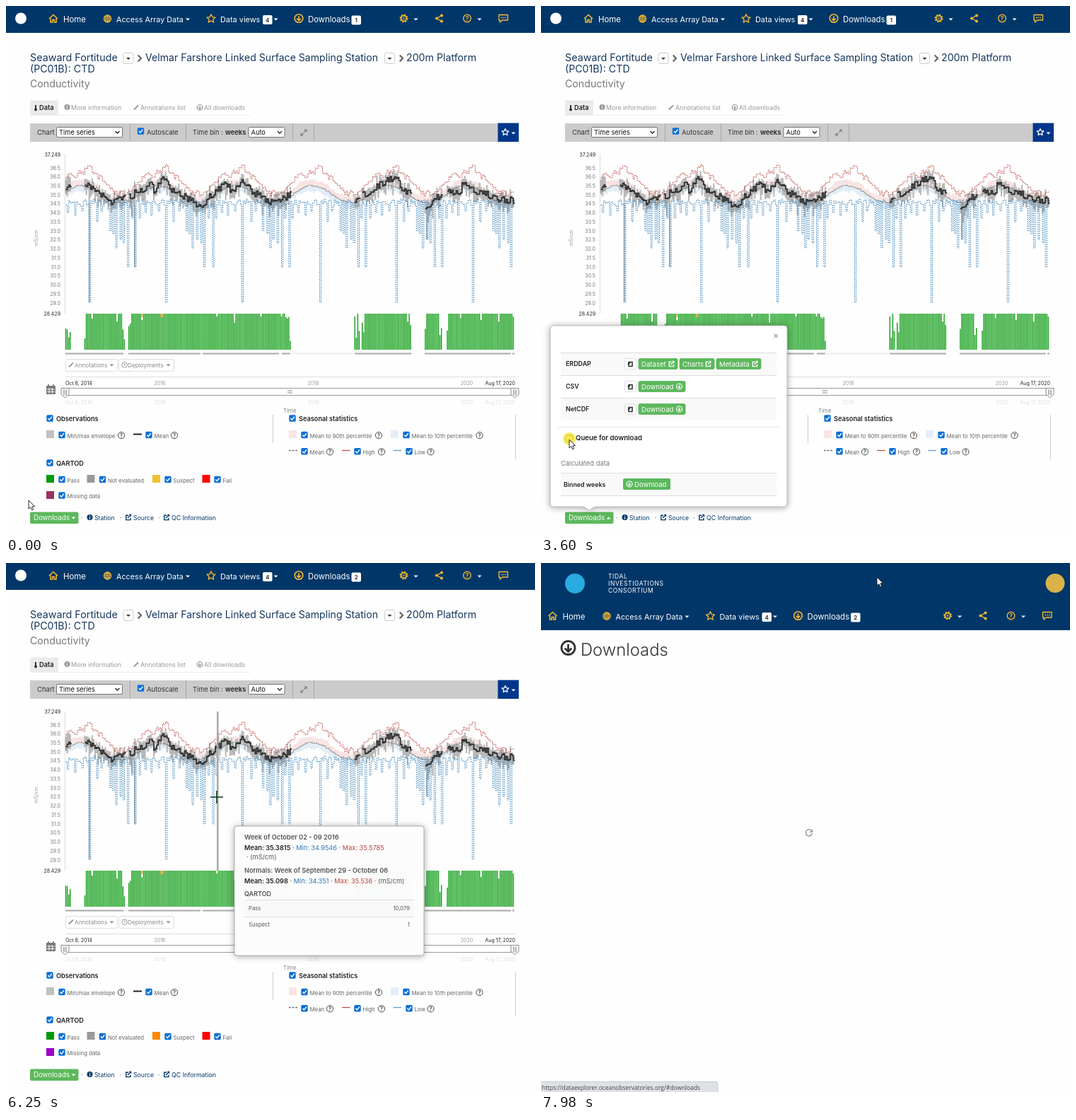
Write an HTML page that moves like this. It is 748 px wide and 748 px high and loops after 8 s.

```html
<!DOCTYPE html>
<html lang="en">
<head>
<meta charset="utf-8">
<title>Downloads</title>
<style>
html, body { margin: 0; width: 100%; height: 100%; overflow: hidden; background: #fff; }
svg { display: block; width: 100vw; height: 100vh; }
text { font-family: Inter, "Open Sans", sans-serif; }
.b { font-weight: 600; }
.l { font-weight: 300; }
.m { text-anchor: middle; }
.e { text-anchor: end; }
.url { font-family: "Open Sans", "Noto Sans", sans-serif; }
.shade { filter: drop-shadow(0 1px 5px rgba(0,0,0,.35)); }
</style>
</head>
<body>
<svg id="stage" viewBox="0 0 748 748"></svg>
<script>
const NAVY = '#003768', GOLD = '#fdbb30', GREEN = '#5cb85c', INK = '#333', MUTE = '#999';

// Drawing helpers, all return SVG markup
const text = (x, y, s, size, fill = INK, cls = '', more = '') =>
  `<text x="${x}" y="${y}" font-size="${size}" fill="${fill}" class="${cls}" ${more}>${s}</text>`;
const rect = (x, y, w, h, fill, more = '') =>
  `<rect x="${x}" y="${y}" width="${w}" height="${h}" fill="${fill}" ${more}/>`;
const line = (d, stroke, w = 1, more = '') =>
  `<path d="${d}" fill="none" stroke="${stroke}" stroke-width="${w}" ${more}/>`;
const fillPath = (d, fill, more = '') => `<path d="${d}" fill="${fill}" ${more}/>`;
const circle = (x, y, r, fill, more = '') =>
  `<circle cx="${x}" cy="${y}" r="${r}" fill="${fill}" ${more}/>`;
const ring = (x, y, r, stroke, w = 1) =>
  circle(x, y, r, 'none', `stroke="${stroke}" stroke-width="${w}"`);
const at = (x, y, body) => `<g transform="translate(${x} ${y})">${body}</g>`;
const group = (id, body) => `<g id="${id}">${body}</g>`;

const caret = (x, y, fill, up) =>
  fillPath(up ? `M${x - 3} ${y + 1.5}h6l-3-3z` : `M${x - 3} ${y - 1.5}h6l-3 3z`, fill);
const check = (x, y) => rect(x - 4.7, y - 4.7, 9.4, 9.4, '#0b6fd6', 'rx="1.6"') +
  line(`M${x - 2.6} ${y}l2 2.2l3.4-4.4`, '#fff', 1.4);
const help = (x, y) => ring(x, y, 4.6, '#333', .9) + text(x, y + 2.7, '?', 7.5, INK, 'b m');
const down = (x, y, r, c, w = 1.2) => ring(x, y, r, c, w) +
  line(`M${x} ${y - r * .55}v${r * 1.1}m${-r * .5} ${-r * .5}l${r * .5} ${r * .5}l${r * .5} ${-r * .5}`, c, w);
const info = (x, y, c) => circle(x, y, 4, c) + line(`M${x} ${y - 2.4}v1.2m0 1v2.6`, '#fff', 1.3);
const ext = (x, y, c) => at(x, y, line('M0-2.8H-3.2V3.6H3V.8', c, 1.4) +
  line('M-1 1L3 -3', c, 1.4) + fillPath('M.6-4.2H4.2V-.6z', c));
const pencil = (x, y) => line(`M${x - 3} ${y + 3}l6-6`, MUTE, 2);
const clock = (x, y) => ring(x, y, 3.8, MUTE) + line(`M${x} ${y - 2.3}v2.5h1.8`, MUTE);
const star = (x, y, r, c) => {
  let d = '';
  for (let i = 0; i < 10; i++) {
    const a = i * Math.PI / 5, q = i % 2 ? r * .48 : r;
    d += `${i ? 'L' : 'M'}${(x + q * Math.sin(a)).toFixed(2)} ${(y - q * Math.cos(a)).toFixed(2)}`;
  }
  return line(d + 'Z', c, 1.3, 'stroke-linejoin="round"');
};
const button = (x, y, w, h, label) => rect(x, y, w, h, GREEN, 'rx="2" stroke="#4cae4c" stroke-width=".7"') +
  text(x + 4, y + h / 2 + 3.5, label, 9.6, '#fff');
const rand = n => { const s = Math.sin(n * 127.1 + 11.7) * 43758.5453; return s - Math.floor(s); };

// Navigation bar; the left and right halves shift separately
function nav(dl, dr, dy, badge) {
  const y = 18;
  const mark = (x, cy, s, id) => rect(x, cy - 6.5, 13.5, 13, '#fff', 'rx="2"') +
    text(x + 6.7, cy + 3, s, 8, '#222', 'b m', id ? `id="${id}"` : '');
  const left =
    line('M61 18l6-5.5l6 5.5M63 17.5v5.5h2.7v-3.5h2.6v3.5H71v-5.5', GOLD, 1.5) +
    text(81, 22.5, 'Home', 11.4, '#fff') +
    ring(143.5, y, 5, GOLD, 1.3) + line('M138.5 18h10M143.5 13v10M139.5 15.3h8M139.5 20.7h8', GOLD) +
    `<ellipse cx="143.5" cy="18" rx="2.4" ry="5" fill="none" stroke="${GOLD}"/>` +
    text(156, 22.5, 'Access Array Data', 10.8, '#fff') + caret(257, 19, '#fff') +
    star(290, y, 6.3, GOLD) + text(303, 22.5, 'Data views', 10.9, '#fff') +
    mark(363, 19.5, '4') + caret(381.5, 19, '#fff') +
    down(414, 17.5, 5.8, GOLD, 1.6) + text(427, 23, 'Downloads', 11.3, '#fff') +
    mark(488.5, 20, '2', badge);
  const right =
    ring(562.5, 17.5, 3.8, GOLD, 1.8) + ring(562.5, 17.5, 1.1, GOLD, 1) +
    circle(562.5, 17.5, 5.2, 'none', `stroke="${GOLD}" stroke-width="1.6" stroke-dasharray="2 2.08"`) +
    caret(579.5, 19, '#fff') +
    line('M616 13.5L609 17.5L616 21.5', GOLD, 1.3) +
    circle(616, 13.5, 2, GOLD) + circle(609, 17.5, 2, GOLD) + circle(616, 21.5, 2, GOLD) +
    ring(652, 17.5, 5.3, GOLD, 1.3) + text(652, 20.8, '?', 9, GOLD, 'b m') + caret(669.5, 19, '#fff') +
    line('M697 12.5h12.5v7.5h-8l-3 3v-3h-1.5z', GOLD, 1.3, 'stroke-linejoin="round"') +
    line('M700 16.5h7', GOLD, 1.6, 'stroke-dasharray="1.5 1.2"');
  return at(dl, dy, left) + at(dr, dy, right);
}

// Chart data: weekly steps, one year is 108.5 px wide
const WEEK = 2.075, YEAR = 108.5, X0 = 84.5, WEEKS = 306, SPIKE = 117;
const SEGS = [[84, 92], [110, 168], [173, 403], [493, 501], [503, 574], [591, 617], [622, 720]];
// Yearly dips: offset, depth and the year whose readings reach that low
const DIPS = [[0, 419, 0], [11, 305], [18, 290], [29, 318], [34, 322], [38, 342], [44, 330, 4], [49, 335],
  [54.5, 369], [60, 300], [65.5, 369, 0], [71, 300], [79, 292], [88, 296], [98, 290]];
const HIGH = [[0, 226], [4, 234], [9, 240], [18, 246], [27, 255], [37, 264], [50, 266], [57, 262],
  [64, 252], [74, 243], [82, 240], [92, 238], [99, 236], [104, 231], [108.5, 226]];
const SEEN = [[84, 256], [93, 260], [110, 255], [117, 252], [125, 259], [133, 265], [148, 277], [160, 274],
  [173, 271], [182, 265], [195, 260], [205, 252], [210, 262], [222, 238], [230, 256], [245, 266],
  [262, 275], [275, 283], [290, 268], [300, 260], [310, 250], [320, 262], [333, 247], [345, 260],
  [360, 270], [375, 277], [395, 272], [403, 263], [493, 273], [505, 267], [515, 262], [530, 252],
  [545, 244], [551, 240], [560, 260], [575, 268], [591, 283], [600, 280], [610, 270], [625, 262],
  [640, 267], [648, 246], [655, 254], [665, 263], [680, 267], [695, 274], [720, 275]];

function lerpAt(pts, x) {
  const i = Math.max(1, pts.findIndex(p => p[0] >= x));
  const [a, b] = [pts[i - 1], pts[i]];
  return a[1] + (b[1] - a[1]) * (x - a[0]) / (b[0] - a[0]);
}

function chart() {
  let high = '', low = '', norm = '', seen = '', env = '', bars = '', hot = '';
  const top = [], mid = [], bot = [];
  let was = false;
  for (let i = 0; i < WEEKS; i++) {
    const x = X0 + i * WEEK, end = (x + WEEK).toFixed(1), px = x.toFixed(1);
    const year = Math.floor((x - SPIKE + WEEK / 2) / YEAR);
    const off = (((x - SPIKE) % YEAR) + YEAR) % YEAR;
    const wk = Math.round(off / WEEK) % 52;
    const step = (d, y, move) => d + `${move ? 'M' : 'L'}${px} ${y.toFixed(1)}H${end}`;
    const mean = 265 - 12 * Math.cos((off + 10) / YEAR * 2 * Math.PI) + rand(wk) * 2;
    const dip = DIPS.find(d => Math.min(Math.abs(off - d[0]), YEAR - off + d[0]) <= WEEK / 2);
    high = step(high, lerpAt(HIGH, off) + (rand(wk + 60) - .5) * 10, !i);
    low = step(low, dip ? dip[1] : 273 + rand(wk + 120) * 10, !i);
    norm = step(norm, mean, !i);
    top.push([px, mean - 6 - rand(wk + 9) * 5]);
    mid.push([px, mean]);
    bot.push([px, mean + 5 + rand(wk + 30) * 6]);

    const seg = SEGS.find(s => x >= s[0] && x <= s[1]);
    if (seg) {
      const y = lerpAt(SEEN, x) + (rand(i + 300) - .5) * 10;
      const rise = x < 94 ? 14 : 3 + rand(i + 700) * 9;
      const fall = dip && dip[2] === year ? dip[1] - y : 5 + rand(i + 900) * 10 + (rand(i + 500) > .92 ? 12 : 0);
      seen = step(seen, y, !was);
      env += `M${px} ${(y - rise).toFixed(1)}V${(y + fall).toFixed(1)}`;
      const edge = x - seg[0] < 3 || seg[1] - x < 3.5;
      const loose = rand(i + 77) > .96 || (x > 388 && x < 403 && rand(i) > .5);
      const h = edge ? 12 + 36 * rand(i + 41) : loose ? 38 + 10 * rand(i) : 51;
      bars += `M${px} 486V${(486 - h).toFixed(1)}`;
      if (Math.abs(x - 193) < 1.1 || Math.abs(x - 221) < 2.2) hot += `M${px} 435v5`;
    }
    was = !!seg;
  }
  const area = (a, b, fill) => fillPath('M' + [...a, ...b.slice().reverse()]
    .map(p => p[0] + ' ' + p[1].toFixed(1)).join('L') + 'Z', fill);
  let axis = line('M83.5 210V435', '#ddd');
  for (let v = 36.5; v > 28.9; v -= .5)
    axis += text(77, (231.5 + (36.5 - v) * 25.47).toFixed(1), v.toFixed(1), 7, '#777', 'e');
  axis += text(77, 213, '37.249', 7, '#222', 'e') + text(77, 437.5, '28.429', 7, '#222', 'e') +
    text(0, 0, 'mS/cm', 7, MUTE, 'm', 'transform="translate(44.5 328) rotate(-90)"');
  return axis + area(top, mid, '#f7e4e3') + area(mid, bot, '#e2eef7') +
    line(env, '#b8b8b8', 2.1) + line(norm, '#777', 1.1, 'stroke-dasharray="2 1.5"') +
    line(high, '#b5352c', 1, 'stroke-dasharray="1.5 1.4"') +
    line(low, '#2a7ab5', 1, 'stroke-dasharray="1.6 1.5"') + line(seen, '#2b2b2b', 1.7) +
    line(bars, '#17a01d', 1.45) + line(hot, '#f0a030', 1.6) +
    line('M404 491.5H492', '#eee', 2) +
    line('M84 491.5H166M173 491.5H275M278 491.5H386M390 491.5H402M493 491.5H573M592 491.5H714M716 491.5H719', '#aaa', 2.2);
}

function heading() {
  const blue = '#16375f';
  const drop = x => rect(x, 66.5, 14, 15, '#fff', 'rx="2" stroke="#ccc"') + caret(x + 7, 74.5, '#333');
  const next = x => line(`M${x - 2.3} 69.5l4.3 4.5l-4.3 4.5`, '#666', 2.2);
  return text(34, 78, 'Seaward Fortitude', 14.3, blue) + drop(166) + next(189) +
    text(197, 78, 'Velmar Farshore Linked Surface Sampling Station', 14.1, blue) + drop(535.5) + next(559) +
    text(566, 78, '200m Platform', 14.2, blue) + text(34, 94, '(PC01B): CTD', 14.2, blue) +
    text(34, 115, 'Conductivity', 14.2, '#777');
}

function tools() {
  const select = (x, w, s) => rect(x, 171.5, w, 14, '#fff', 'rx="1.5" stroke="#767676"') +
    text(x + 3.5, 181.8, s, 9.3, '#111') + line(`M${x + w - 10} 177l3 3l3-3`, '#222', 1.4);
  return rect(34, 133.5, 40, 20.5, '#ebebeb') + line('M34 154.5H346', '#eee') +
    line('M42 140v6', '#333', 2) + circle(42, 146.5, 2, '#333') + text(47, 146.5, 'Data', 9.2, '#222', 'b') +
    info(86.5, 143, MUTE) + text(92, 146.5, 'More information', 8.8, MUTE) +
    pencil(184, 143.5) + text(190, 146.5, 'Annotations list', 8.8, MUTE) +
    down(274, 143.3, 3.8, MUTE) + text(280, 146.5, 'All downloads', 8.8, MUTE) +
    rect(34, 166, 662, 26, '#cbcbcb') + line('M175.5 166v26M254.5 166v26M405.5 166v26M435.5 166v26', '#aaa') +
    text(44, 182, 'Chart', 9.5) + select(71.5, 93, 'Time series') +
    check(190.5, 177) + text(199, 182, 'Autoscale', 9.5) +
    text(264, 182, 'Time bin :', 9.2) + text(310, 182, 'weeks', 9.4, '#222', 'b') + select(343, 51, 'Auto') +
    line('M418 182l2.5-2.5M421.5 178.5l2.5-2.5M417 180v3h3M422 175h3v3', '#777', 1.2) +
    rect(695.5, 165.5, 29.5, 26.5, '#00368a') + star(706, 178.5, 5, '#fff') + caret(717.5, 180, '#fff');
}

function slider() {
  const dates = (y, c, c2) => text(84, y, 'Oct 8, 2014', 7, c2) + text(720, y, 'Aug 17, 2020', 7, c2, 'e') +
    [[217.5, 2016], [434.5, 2018], [651.5, 2020]].map(d => text(d[0], y, d[1], 7, c, 'm')).join('');
  const knob = x => fillPath(`M${x - 5.5} 540.5h11v8.5l-5.5 5l-5.5-5z`, '#fff', 'stroke="#888"') +
    line(`M${x - 1.5} 542.5v8M${x + 1.5} 542.5v8`, '#666');
  const tag = (x, w, s) => rect(x, 499.5, w, 17, '#fff', 'rx="2" stroke="#ddd"') +
    text(x + 12.5, 510.5, s, 8.2, '#888') + caret(x + w - 8, 508, '#888');
  return tag(84.5, 73, 'Annotations') + pencil(92, 507.5) + tag(159.5, 78, 'Deployments') + clock(167.5, 507.5) +
    line('M84 524.5H720', '#ddd') + dates(536, MUTE, '#222') +
    rect(57, 537, 13, 12, '#777', 'rx="1"') + line('M58 542h11M58 545.5h11M61 540v8M65.5 540v8', '#fff', .9) +
    line('M60 535v3M67 535v3', '#777', 1.8) +
    rect(84, 540.5, 636, 10, '#fff', 'stroke="#999"') + line('M398 544h7M398 547h7', '#888') +
    knob(83.5) + knob(719.5) + dates(563, '#ddd', '#ddd') + text(392, 574.5, 'Time', 8, '#888');
}

function legend() {
  const head = (x, y, s) => check(x, y) + text(x + 9, y + 3.5, s, 9.2, '#222', 'b');
  const item = (x, y, s, q) => check(x, y) + text(x + 7.5, y + 4.3, s, 7.8, '#666') + (q ? help(q, y + .6) : '');
  const box = (x, y, c, id) => rect(x, y, 11, 11, c, id ? `id="${id}"` : '');
  return head(62, 583, 'Observations') + head(405, 583, 'Seasonal statistics') + head(62, 646, 'QARTOD') +
    box(57, 600, '#c0c0c0') + item(79, 606.5, 'Min/max envelope', 163) +
    line('M180 605.5h12', '#222', 2) + item(202, 606.5, 'Mean', 238) +
    box(400, 600, '#f8e5e4') + item(422, 606.5, 'Mean to 90th percentile', 527) +
    box(544, 600, '#e3eef8') + item(566, 606.5, 'Mean to 10th percentile', 669.5) +
    line('M400 628.5h12', '#777', 1.3, 'stroke-dasharray="3 1.5"') + item(422, 629.7, 'Mean', 458) +
    line('M475 628.5h11.5', '#bd5347', 1.3) + item(497, 629.7, 'High', 531) +
    line('M547.5 628.5h11.5', '#5f9dc8', 1.3) + item(570, 629.7, 'Low', 600.5) +
    line('M377.5 578v40M720.5 578v63', '#ccc') +
    box(57, 663, '#009a0c') + item(79, 669.5, 'Pass') +
    box(114.5, 663, '#999') + item(136.5, 669.5, 'Not evaluated') +
    box(207, 663, '#f0c132', 'suspect') + item(229, 669.5, 'Suspect') +
    box(277.5, 663, '#f00') + item(299, 669.5, 'Fail') +
    box(57, 686, '#963365', 'missing') + item(79, 692, 'Missing data');
}

function footer() {
  const dot = x => text(x, 727, '·', 9, '#444', 'm');
  return rect(34, 715.5, 68.5, 16.5, GREEN, 'rx="2" id="main"') + text(39, 727, 'Downloads', 9.7, '#fff') +
    group('shut', caret(95.5, 724, '#fff')) + group('open', caret(95.5, 724, '#fff', true)) +
    rect(35, 716.5, 67, 15, 'none', 'rx="2" stroke="#111" stroke-width="1.8" id="focus"') +
    dot(107) + info(118.5, 723, NAVY) + text(125, 726.7, 'Station', 8.7, NAVY) + dot(162) +
    ext(173, 723, NAVY) + text(180, 726.7, 'Source', 8.7, NAVY) + dot(216) +
    ext(227, 723, NAVY) + text(234, 726.7, 'QC Information', 8.8, NAVY);
}

function popup() {
  const copy = y => rect(118.5, y - 7.5, 16, 15, '#fff', 'rx="2" stroke="#ddd"') +
    line(`M124 ${y - 2.5}h5v6h-5z`, '#333', 1.6) + line(`M123 ${y + 1}l3-3`, '#333', 2);
  const row = (y, s, fill) => rect(28, y - 16, 305, 32, fill) + line(`M28 ${y - 15.5}H333`, '#ddd') +
    text(35, y + 3, s, 8.9, '#222', 'b');
  const card = fillPath('M17 452H344a4 4 0 0 1 4 4V704a4 4 0 0 1 -4 4H76l-8 5l-8-5H17a4 4 0 0 1 -4-4V456a4 4 0 0 1 4-4z',
    '#fff', 'stroke="#bbb" class="shade"');
  const get = y => button(138, y - 7.5, 66, 15, 'Download') + down(195.5, y, 4, '#fff');
  return card + line('M329.5 464l5 5m0-5l-5 5', '#aaa', 1.5) +
    row(506, 'ERDDAP', '#f9f9f9') + row(538, 'CSV', '#fff') + row(570, 'NetCDF', '#f9f9f9') +
    copy(506) + copy(538) + copy(570) +
    button(138, 498.5, 55, 15, 'Dataset') + ext(184.5, 506, '#fff') +
    button(196, 498.5, 49, 15, 'Charts') + ext(236.5, 506, '#fff') +
    button(248, 498.5, 63, 15, 'Metadata') + ext(302.5, 506, '#fff') + get(538) + get(570) +
    line('M24 595.5H336', '#e5e5e5') +
    rect(35.5, 607, 9, 9, '#fff', 'rx="1.5" stroke="#767676"') + group('queued', check(40, 611.5)) +
    text(49, 613.5, 'Queue for download', 9.6, '#222', 'b') +
    text(28, 649.5, 'Calculated data', 9.4, '#777') +
    rect(28, 660, 305, 32, '#f9f9f9') + line('M28 660.5H333M28 692.5H333', '#ddd') +
    text(32, 679.5, 'Binned weeks', 8.8, '#222', 'b') +
    rect(116, 668, 67, 16, GREEN, 'rx="2"') + down(125, 676, 4, '#fff') + text(132, 679.5, 'Download', 9.6, '#fff');
}

function tip() {
  const stats = (y, mean, min, max, tail) => text(14, y, `<tspan class="b" fill="#222">Mean: ${mean}</tspan> · ` +
    `<tspan fill="#2f78b7">Min: ${min}</tspan> · <tspan fill="#b8463b">Max: ${max}</tspan>${tail}`, 9.2, '#555');
  return rect(0, 0, 268, 183, '#fff', 'rx="3" stroke="#aaa" class="shade" fill-opacity=".97"') +
    text(14, 19, 'Week of October 02 - 09 2016', 9.2, '#555', 'b') +
    stats(34, '35.3815', '34.9546', '35.5785', '') + text(17, 47, '· (mS/cm)', 9.2, '#555') +
    text(14, 66, 'Normals: Week of September 29 - October 06', 9.2, '#555', 'b') +
    stats(81, '35.098', '34.351', '35.536', ' · (mS/cm)') +
    text(14, 99, 'QARTOD', 9, '#555', 'b') +
    rect(14, 104, 240, 24, '#f8f8f8') + line('M14 104.5h240M14 128.5h240', '#ddd') +
    text(20, 119, 'Pass', 7.7, '#555') + text(248, 119, '10,079', 7.7, '#555', 'e') +
    text(20, 142, 'Suspect', 7.8, '#555') + text(248, 142, '1', 7.7, '#555', 'e');
}

const toast = rect(269.5, 148.5, 206, 43, '#fdfcc9', 'stroke="#d8d6a0" class="shade"') +
  text(285, 173.5, `Item added to <tspan fill="${NAVY}">download queue.</tspan>`, 9.85, '#333', 'b') +
  line('M452 166.5l6.5 6.5m0-6.5l-6.5 6.5', '#888', 2);

const page1 = rect(0, 0, 748, 38, NAVY) +
  group('active', rect(396, 0, 118.5, 40, '#000') + rect(396, 38, 118.5, 2.5, GOLD)) +
  circle(21, 17.5, 8, '#fff') + nav(0, 0, 0, 'badge') +
  heading() + tools() + chart() + slider() + legend() + footer();

const page2 = rect(0, 0, 748, 748, '#fefefe') + rect(0, 0, 748, 95, NAVY) +
  circle(48, 29, 14, '#29abe2') + circle(727, 28.5, 13.5, '#d9b24a') +
  ['TIDAL', 'INVESTIGATIONS', 'CONSORTIUM'].map((s, i) =>
    text(95, 21.5 + i * 10.2, s, 8.5, '#fff', '', 'letter-spacing=".6"')).join('') +
  nav(-50.5, 12.5, 57, '') + down(38.5, 120, 9.5, '#333', 2.8) + text(56, 130.5, 'Downloads', 23.8, '#333', 'l') +
  group('spin', line('M382.6 378.6a4.6 4.6 0 1 0 .9 3.6', '#999', 1.5) + fillPath('M384 376.5v4.5h-4.5z', '#999'));

const $ = id => document.getElementById(id);
$('stage').innerHTML = rect(0, 0, 748, 748, '#fefefe') + group('page1', page1) +
  group('popup', popup()) + group('toast', toast) +
  group('ruler', line('M0 210V435', '#aaa', 2.6)) + group('tip', tip()) + group('page2', page2) +
  group('status', rect(-3, 733.5, 253, 17, '#dee1e6', 'rx="3" stroke="#c8ccd2"') +
    text(1, 745, 'https://dataexplorer.oceanobservatories.org/#downloads', 8.4, '#444', 'url')) +
  group('glow', circle(0, -1, 9, '#f2e21c', 'opacity=".72"')) +
  group('cross', line('M-9 0H9M0-9V9', '#0c3a1a', 1.6)) +
  group('arrow', fillPath('M0 0V12L2.8 9.5L4.7 13.8L6.7 12.9L4.9 8.8L8.5 8.6Z', '#fff', 'stroke="#111" stroke-width=".9"'));

// Pointer moves: start, end, steps, target x, y
const MOVES = [[190, 630, 5, 64, 723], [1940, 2700, 8, 35, 624], [2820, 2920, 2, 37, 613],
  [3140, 3360, 3, 40, 613], [4600, 5260, 7, 336, 466], [5820, 6250, 5, 298, 331],
  [6350, 6350, 1, 490, 250], [6460, 6910, 5, 473, 40], [7010, 7110, 2, 475, 20]];
const CLICKS = [[960, 1070], [3600, 3830], [5490, 5600], [7760, 7870]];

function pointer(t) {
  let x = 32, y = 699;
  for (const [a, b, n, tx, ty] of MOVES) {
    if (t < a) break;
    const k = t >= b ? 1 : (Math.floor((t - a) / (b - a) * (n - 1) + 1e-6) + 1) / n;
    x += (tx - x) * k;
    y += (ty - y) * k;
  }
  return [x, y];
}

const show = (id, on) => $(id).setAttribute('opacity', +on);
const move = (id, x, y) => $(id).setAttribute('transform', `translate(${x.toFixed(1)} ${y.toFixed(1)})`);

function draw(t) {
  const [x, y] = pointer(t), within = (a, b) => t >= a && t < b;
  const hover = within(5820, 6460), open = within(1070, 5600);
  show('popup', within(1070, 1190) ? .5 : open);
  show('open', open);
  show('shut', !open);
  show('focus', within(960, 3600));
  $('main').setAttribute('fill', within(410, 2050) ? '#449d44' : GREEN);
  show('queued', t >= 3830);
  show('active', within(3830, 5930));
  show('toast', within(5820, 5930) ? .5 : within(3830, 5820));
  $('badge').textContent = t < 3830 ? '1' : '2';
  $('suspect').setAttribute('fill', t < 1190 ? '#f0c132' : '#ff8800');
  $('missing').setAttribute('fill', t < 1190 ? '#963365' : '#9a00c8');
  ['tip', 'ruler', 'cross'].forEach(id => show(id, hover));
  move('tip', x + 25 + 268 > 748 ? x - 280 : x + 25, y + 41);
  move('ruler', x + 1.3, 0);
  move('cross', x, y);
  show('arrow', !hover);
  move('arrow', x, y);
  show('glow', CLICKS.some(c => within(...c)));
  move('glow', x, y);
  show('status', within(7210, 7330) ? .6 : t >= 7330);
  show('page2', t >= 7870);
  show('spin', t >= 7980);
}

const t0 = performance.now();
function tick(now) {
  draw(Math.max(0, now - t0) % 8000);
  requestAnimationFrame(tick);
}
draw(0);
requestAnimationFrame(tick);
</script>
</body>
</html>
```
